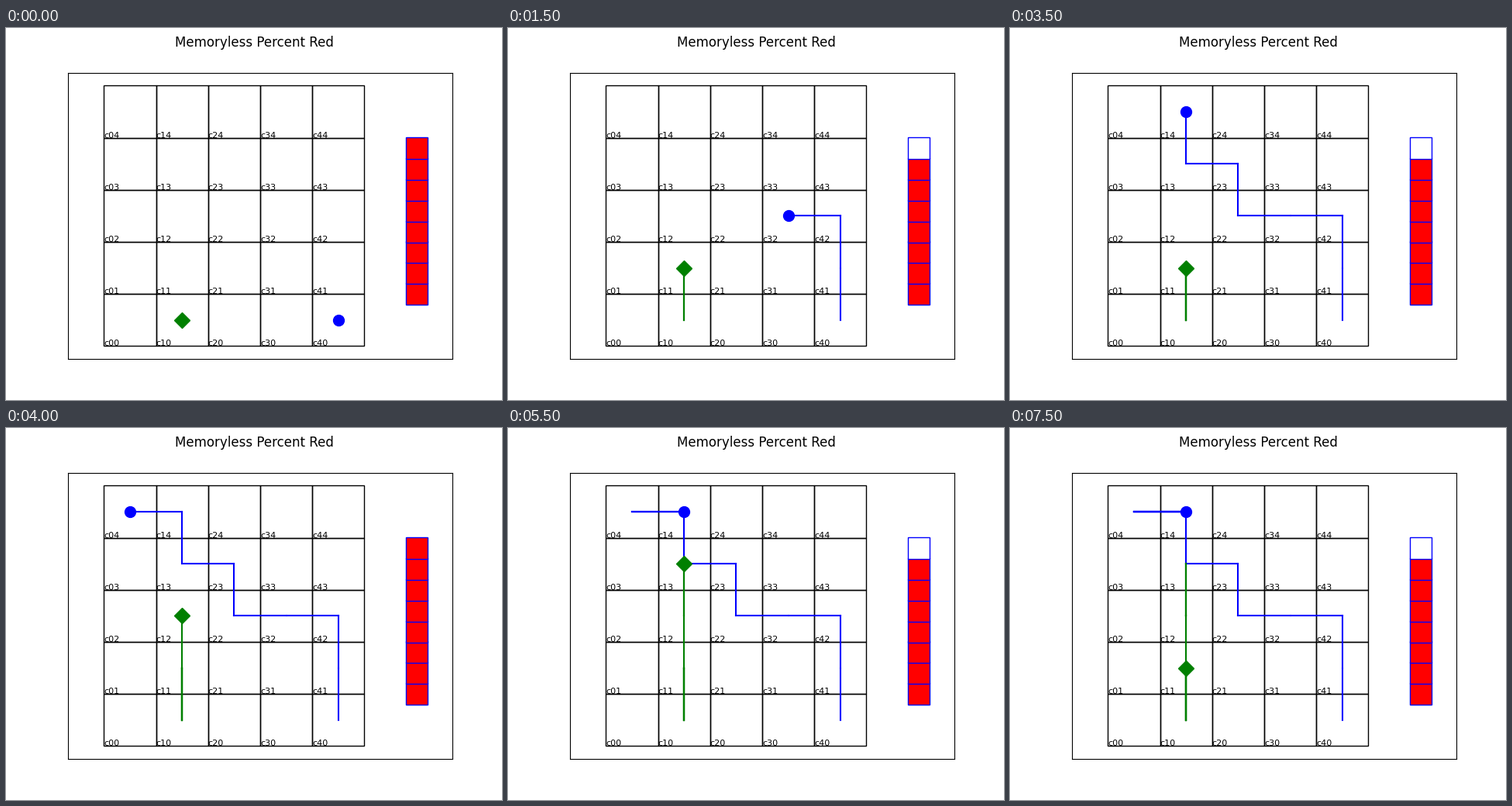
Recreate the animation shown at these times as a matplotlib script. Size 640 by 480 pixels, loop 8000 ms.

```python
import matplotlib.pyplot as plt
from matplotlib.animation import FuncAnimation
from matplotlib.patches import Rectangle

SIZE = 5
CHARGE_CELLS = 8
STEP_MS = 500
MOVES = {"U": (0, 1), "D": (0, -1), "L": (-1, 0), "R": (1, 0)}

plt.rcParams["font.family"] = "DejaVu Sans"
fig = plt.figure(figsize=(6.4, 4.8), dpi=100, facecolor="white")
fig.suptitle("Memoryless Percent Red", fontsize=12)
ax = fig.add_axes([0.125, 0.11, 0.775, 0.77])

# Equal scale on both axes, centred on x = 3
unit = 369.6 / 5.5
half = 496 / unit / 2
ax.set_xlim(3 - half, 3 + half)
ax.set_ylim(-0.25, 5.25)
ax.set_xticks([])
ax.set_yticks([])

for x in range(SIZE):
    for y in range(SIZE):
        ax.add_patch(Rectangle((x, y), 1, 1, fill=False, ec="black", lw=1))
        ax.text(x, y, f"c{x}{y}", fontsize=8)


def walk(start, moves):
    """Cell centres visited from start."""
    x, y = start
    path = [(x + 0.5, y + 0.5)]
    for m in moves:
        dx, dy = MOVES[m]
        x, y = x + dx, y + dy
        path.append((x + 0.5, y + 0.5))
    return path


class Agent:
    def __init__(self, start, moves, color, marker):
        self.path = walk(start, moves)
        # One line per step, so repeated steps build up
        self.trail = [
            ax.plot(*zip(a, b), color=color, lw=1.5)[0]
            for a, b in zip(self.path, self.path[1:])
        ]
        self.dot, = ax.plot([], [], marker, color=color, ms=10, zorder=3)

    def show(self, step):
        for i, line in enumerate(self.trail):
            line.set_visible(i < step)
        x, y = self.path[step]
        self.dot.set_data([x], [y])


agents = [
    Agent((4, 0), "UULLULU" + "LR" * 4, "blue", "o"),
    Agent((1, 0), "UDUDUDU" + "UUDUDDDU", "green", "D"),
]

battery = [
    ax.plot(6, 1 + 0.4 * i, "s", ms=20, mec="blue", mfc="red")[0]
    for i in range(CHARGE_CELLS)
]


def update(step):
    for agent in agents:
        agent.show(step)
    charge = CHARGE_CELLS - step % 2
    for i, cell in enumerate(battery):
        cell.set_markerfacecolor("red" if i < charge else "white")
    return []


anim = FuncAnimation(fig, update, frames=16, interval=STEP_MS,
                     repeat=True, repeat_delay=0, blit=False)
plt.show()
```
